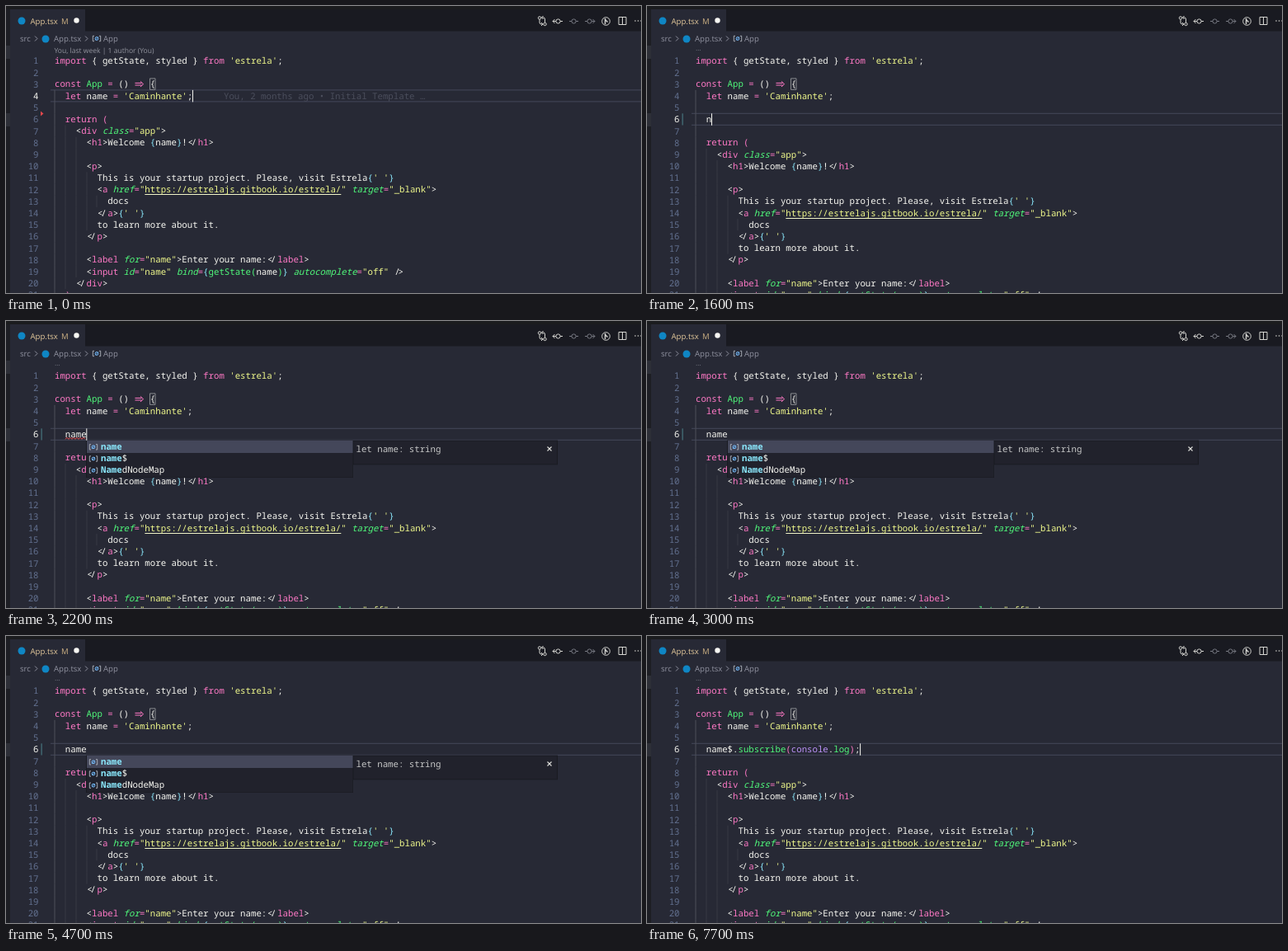
Write an HTML page with a canvas that moves like this. It is 770 by 348 pixels and loops after 8 s.

```html
<!DOCTYPE html>
<html>
<head>
<meta charset="utf-8">
<title>Code editor</title>
<style>
  html, body { margin: 0; height: 100%; overflow: hidden; background: #272935; }
  canvas { display: block; }
</style>
</head>
<body>
<canvas id="stage" width="770" height="348"></canvas>
<script>
const ctx = document.getElementById('stage').getContext('2d');
const LOOP = 8000, CELL = 6.432, ROW = 14.2, LEFT = 59;
const MONO = '10.72px "Noto Sans Mono", monospace';
const SANS = '"Open Sans", sans-serif';
const COLORS = {
  w: '#f8f8f2', p: '#ff79c6', g: '#50fa7b', i: '#50fa7b', y: '#f1fa8c',
  u: '#f1fa8c', c: '#8be9fd', v: '#bd93f9', b: '#8be9fd'
};

// "^x" switches the style: i = italic, u = underlined, b = bold
const HEAD = [
  "^pimport^w { getState, styled } ^pfrom ^y'estrela'^w;",
  "",
  "^pconst ^gApp ^p=^w () ^p=>^w {",
  "  ^plet^w name ^p= ^y'Caminhante'^w;"
];
const TAIL = [
  "",
  "  ^preturn (",
  "    ^w<^pdiv ^iclass^p=^y\"app\"^w>",
  "      ^w<^ph1^w>Welcome ^c{^wname^c}^w!</^ph1^w>",
  "",
  "      ^w<^pp^w>",
  "        ^wThis is your startup project. Please, visit Estrela^c{^y' '^c}",
  "        ^w<^pa ^ihref^p=^y\"^uhttps://estrelajs.gitbook.io/estrela/^y\" ^itarget^p=^y\"_blank\"^w>",
  "          ^wdocs",
  "        ^w</^pa^w>^c{^y' '^c}",
  "        ^wto learn more about it.",
  "      ^w</^pp^w>",
  "",
  "      ^w<^plabel ^ifor^p=^y\"name\"^w>Enter your name:</^plabel^w>",
  "      ^w<^pinput ^iid^p=^y\"name\" ^ibind^p=^c{^ggetState(^wname^g)^c} ^iautocomplete^p=^y\"off\" ^w/>",
  "    ^w</^pdiv^w>",
  "  ^p);"
];
// [time, inserted lines, text of the last inserted line]
const EDITS = [
  [-100, 0, ""],
  [600, 1, "  "],
  [800, 2, "  "],
  [1500, 2, "  ^wn"],
  [1700, 2, "  ^wna"],
  [1900, 2, "  ^wnam"],
  [2190, 2, "  ^wname"],
  [5800, 2, "  ^wname$"],
  [6700, 2, "  ^wname$.^gsubscribe^p(^vconsole^w.^glog^p)^w;"]
];

const plain = line => line.replace(/\^./g, '');
const indent = line => line.search(/\S/);
const rowY = row => 59.3 + row * ROW;

function rect(x, y, w, h, color) {
  ctx.fillStyle = color;
  ctx.fillRect(x, y, w, h);
}
function text(str, x, y, color, font = MONO) {
  ctx.font = font;
  ctx.fillStyle = color;
  ctx.fillText(str, x, y);
}
function path(d, color, width = 1) {
  ctx.strokeStyle = color;
  ctx.lineWidth = width;
  ctx.stroke(new Path2D(d));
}
function disc(x, y, r, color) {
  ctx.fillStyle = color;
  ctx.beginPath();
  ctx.arc(x, y, r, 0, 7);
  ctx.fill();
}
const ring = (x, y, r, color) =>
  path(`M${x - r} ${y}a${r} ${r} 0 1 0 ${2 * r} 0a${r} ${r} 0 1 0 ${-2 * r} 0`, color);

// Draws styled text on the character grid, joining "</", "/>" and "=>"
function code(line, x, y) {
  for (const part of ('w' + line).split('^')) {
    const style = part[0], color = COLORS[style];
    const font = (style === 'i' ? 'italic ' : style === 'b' ? 'bold ' : '') + MONO;
    if (style === 'u') rect(x, Math.round(y + 2), (part.length - 1) * CELL, 1, '#f0f4c8');
    for (const run of part.slice(1).split(/(<\/|\/>|=>)/)) {
      if (run === '=>') {
        path(`M${x + 1} ${y - 5}h8M${x + 1} ${y - 2.4}h8M${x + 7.5} ${y - 7}l3.6 3.3l-3.6 3.3`, color);
      } else if (run === '</' || run === '/>') {
        text(run[0], x + .6, y, color, font);
        text(run[1], x + CELL - 1.6, y, color, font);
      } else {
        text(run, x, y, color, font);
      }
      x += run.length * CELL;
    }
  }
}

function symbolIcon(x, y) {
  path(`M${x - 3} ${y - 3.2}h-1.7v6.4h1.7M${x + 3} ${y - 3.2}h1.7v6.4h-1.7`, '#b4b7c0', .9);
  ring(x, y, 1.9, '#75beff');
  path(`M${x - 2} ${y + 2}l4 -4`, '#75beff', .8);
}

function drawFrame() {
  rect(0, 0, 770, 348, '#272935');
  rect(0, 0, 770, 4, '#1b1c1e');
  rect(0, 4, 5, 344, '#1d1e24');
  rect(0, 48, 5, 16, '#2d2f37');
  rect(0, 130, 5, 16, '#2d2f37');
  rect(96, 4, 674, 26.5, '#191a21');

  const tabFont = '9.6px ' + SANS;
  disc(19, 18, 4.5, '#0f86c4');
  text('App.tsx', 29.5, 21.5, '#e2c79a', tabFont);
  text('M', 67, 21.5, '#cfb284', tabFont);
  disc(85.5, 17.5, 3.2, '#f8f8f2');

  const crumb = '#9092a0';
  text('src', 17, 43, crumb, tabFont);
  path('M35 36.5l3 3l-3 3M96 36.5l3 3l-3 3', crumb);
  disc(48, 40, 4.5, '#0f86c4');
  text('App.tsx', 58, 43, crumb, tabFont);
  symbolIcon(110, 39.5);
  text('App', 118, 43, crumb, tabFont);

  const bright = '#d6d6d2', dim = '#777982';
  ring(647, 14.5, 1.7, bright);
  ring(653.5, 22, 1.7, bright);
  path('M647 16.5v3.5q0 2 2 2h2m-2-2l2 2l-2 2M653.5 20v-4q0-2-2-2h-2m2-2l-2 2l2 2', bright);
  ring(669.5, 18.5, 2.6, bright);
  path('M672 18.5h3M667 18.5h-4m2.5-2.5l-2.5 2.5l2.5 2.5', bright);
  ring(688.5, 18.5, 2.6, dim);
  path('M683 18.5h3M691 18.5h3', dim);
  ring(707.5, 18.5, 2.6, dim);
  path('M702 18.5h3M710 18.5h4m-2.5-2.5l2.5 2.5l-2.5 2.5', dim);
  ring(727.5, 18.5, 4.8, bright);
  path('M726.5 15v7M726.5 16.5l3 3', bright, 1.4);
  path('M743 13.5h9v9h-9zM747.5 13.5v9', bright);
  for (const x of [763, 766.5, 770]) disc(x, 18, .8, bright);
}

function drawPopup(t, typed) {
  const second = t >= 4000 && t < 4200 || t >= 5000;
  rect(97, 144.6, 324, 45.4, '#191a21');
  rect(98, 145, 322.5, 44.4, '#21222c');
  rect(98, 145 + (second ? ROW : 0), 322.5, 15, '#44475a');
  ['name', 'name$', 'NamedNodeMap'].forEach((item, i) => {
    const y = 156 + i * ROW;
    symbolIcon(106, y - 3.2);
    code(`^b${item.slice(0, typed)}^w${item.slice(typed)}`, 115, y);
  });
  rect(421, 144.6, 248, 29.7, '#191a21');
  rect(421.5, 145.5, 246.5, 28, '#21222c');
  text(second ? 'let name$: Signal<string>' : 'let name: string', 424.5, 158.5, '#c6c7c7');
  path('M656.5 152.5l5 5m0-5l-5 5', '#e0e0dc', 1.1);
}

function draw(t) {
  const [since, added, typed] = EDITS.filter(e => t >= e[0]).pop();
  const lines = [...HEAD, ...(added > 1 ? [''] : []), ...(added ? [typed] : []), ...TAIL];
  const current = 3 + added;
  const top = rowY(current);
  drawFrame();

  if (added) text('…', 59, 54, '#737580', '8.54px ' + SANS);
  else text('You, last week | 1 author (You)', 58.5, 57, '#91939d', '8.54px ' + SANS);

  rect(54, top - .5, 716, 1, '#44475a');
  rect(54, top + ROW - .7, 716, 1, '#44475a');

  lines.forEach((line, row) => {
    const y = rowY(row), source = plain(line);
    const depth = indent(source) >= 0 ? indent(source)
      : Math.max(0, indent(lines.slice(row).map(plain).find(l => l.trim())));
    for (let col = 0; col < depth; col += 2)
      rect(Math.round(LEFT + col * CELL) - .5, y, 1, ROW, col ? '#383a45' : '#4e505b');
    const label = String(row + 1);
    text(label, 39.5 - label.length * CELL, y + 11, row === current ? '#f8f8f2' : '#62708f');
    code(line, LEFT, y + 10.7);
  });
  path(`M174.5 ${rowY(2) + .2}h6.5v13.5h-6.5z`, '#888a8e');

  if (!added) {
    text('You, 2 months ago • Initial Template …', 264, top + 10.7, '#4b4e5c');
    ctx.fillStyle = '#e0484c';
    ctx.fill(new Path2D('M42 127.5l3.5 3l-3.5 3z'));
  } else if (t < 6700) {
    rect(42.4, top, 1.5, ROW, '#41656f');
  }

  const length = plain(typed).length;
  if (t >= 1900 && t < 2900) {
    let wave = `M72 ${top + 13}`;
    for (let x = 2; x <= (length - 2) * CELL; x += 4) wave += 'l2 -2l2 2';
    path(wave, '#ff5555');
  }
  if (t >= 1700 && t < 5800) drawPopup(t, length - 2);

  if (Math.floor((t - since) / 500) % 2 === 0) {
    const col = plain(lines[current]).length;
    rect(LEFT + col * CELL - .3, top, 1, 14.5, '#f8f8f2');
  }
}

ctx.textRendering = 'geometricPrecision';
(function tick() {
  draw(performance.now() % LOOP);
  requestAnimationFrame(tick);
})();
</script>
</body>
</html>
```
